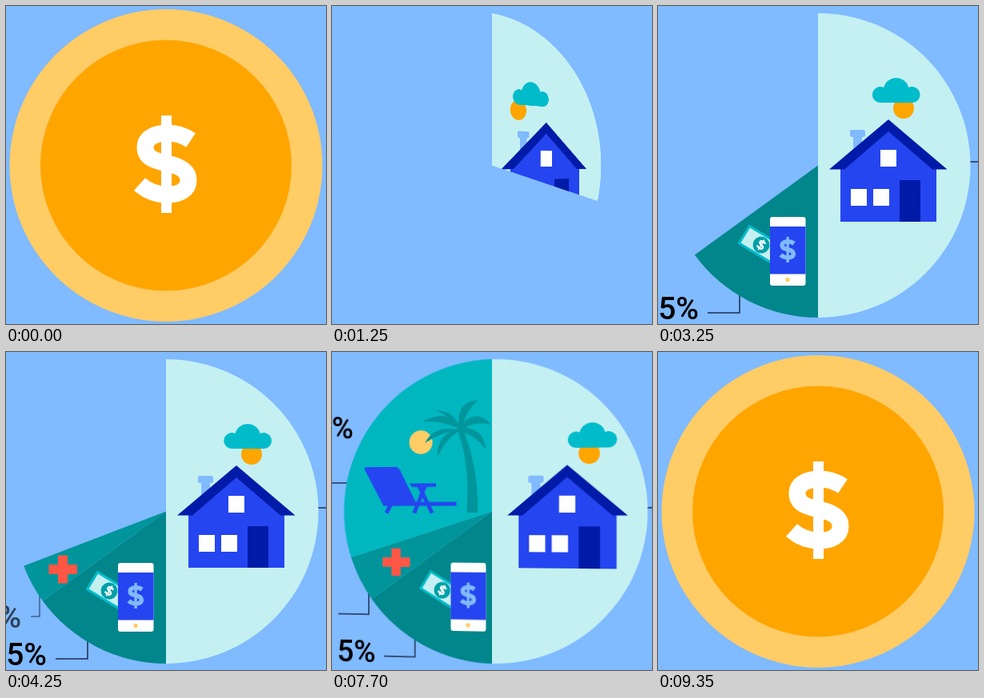
An HTML page for the animation above (9400 ms loop, 400x398 px).

```html
<!DOCTYPE html>
<html lang="en">
<head>
<meta charset="utf-8">
<title>Spending pie</title>
<style>
  html, body { margin: 0; width: 100%; height: 100%; overflow: hidden; background: #80baff; }
  svg { position: absolute; left: 0; top: 0; width: 400px; height: 398px; overflow: visible; transform-origin: 200px 199.5px; }
  text { font: 500 39px Roboto, sans-serif; text-anchor: end; }
  .lead { fill: none; stroke: #1c2d50; stroke-width: 1.5; }
</style>
</head>
<body>
<svg id="pie" viewBox="0 0 400 398">
  <defs>
    <clipPath id="clipHome"><path id="sliceHome"/></clipPath>
    <clipPath id="clipBills"><path id="sliceBills"/></clipPath>
    <clipPath id="clipHealth"><path id="sliceHealth"/></clipPath>
    <clipPath id="clipLeisure"><path id="sliceLeisure"/></clipPath>
    <!-- dollar sign centred on 0,0 -->
    <g id="dollar">
      <path fill="none" stroke="currentColor" stroke-width="21" d="M31-30C22-36 13-39 3-39C-14-39-26-33-26-21C-26-7-12-4 1-1C16 2 28 7 28 20C28 32 17 38 2 38C-12 38-23 34-33 25"/>
      <path fill="currentColor" d="M-6-61H7V61H-6Z"/>
    </g>
  </defs>

  <g id="labels">
    <g id="labelHome"><path class="lead"/></g>
    <g id="labelBills"><path class="lead"/><text y="392">15%</text></g>
    <g id="labelHealth"><path class="lead"/><text y="345">5%</text></g>
    <g id="labelLeisure"><path class="lead"/><text y="106">30%</text></g>
  </g>

  <g clip-path="url(#clipHome)">
    <path fill="#c4f0f2" d="M0 0H400V398H0Z"/>
    <circle id="daySun" cx="307" cy="128" r="13" fill="#ffa500"/>
    <path id="cloud" fill="#00bccb" d="M-19 121A10 10 0 1 1-15.500 102A16 16 0 0 1 15.500 102A10 10 0 1 1 19 121Z"/>
    <g id="house">
      <path fill="#80baff" d="M242 155H257Q259 155 259 157V162Q259 164 255 164V190H244V164Q240 164 240 162V157Q240 155 242 155Z"/>
      <path fill="#2545f0" d="M228 204L288 152L348 204V270H228Z"/>
      <path fill="#001ba8" d="M288 142L361.500 204.500H343L288 157L233 204.500H214ZM302 218H328V270H302Z"/>
      <path fill="#fff" d="M278 180H298V201H278ZM241 229H261V250H241ZM269 229H289V250H269Z"/>
    </g>
  </g>

  <g clip-path="url(#clipBills)">
    <path fill="#00868b" d="M0 0H400V398H0Z"/>
    <g id="bills">
      <g transform="translate(129 299) rotate(31)">
        <rect x="-24.500" y="-12.500" width="49" height="25" fill="#c4f0f2" stroke="#00bccb" stroke-width="3"/>
        <circle r="10.500" fill="#00a0a8"/>
        <use href="#dollar" transform="scale(.12)" color="#fff"/>
      </g>
      <rect x="140" y="264" width="44.500" height="86" rx="3" fill="#fff"/>
      <path fill="#2545f0" d="M140 276H184.500V335.500H140Z"/>
      <circle cx="162" cy="342.500" r="2.700" fill="#ffcc66"/>
      <use href="#dollar" transform="translate(162 305) scale(.262)" color="#80baff"/>
    </g>
  </g>

  <g clip-path="url(#clipHealth)">
    <path fill="#00959b" d="M0 0H400V398H0Z"/>
    <path id="cross" fill="#ff5645" d="M65 246.500H77V258H89V270H77V281.500H65V270H53.500V258H65Z"/>
  </g>

  <g clip-path="url(#clipLeisure)">
    <path fill="#00b7c0" d="M0 0H400V398H0Z"/>
    <circle id="eveSun" cx="103" cy="112" r="15" fill="#ffcc66"/>
    <g fill="#00949b">
      <path d="M156 96Q173 140 168 201H182Q183 140 162 93Z"/>
      <path d="M159 96Q146 68 111 86Q136 84 159 96Z"/>
      <path d="M159 97Q126 90 115 113Q136 99 159 97Z"/>
      <path d="M159 95Q129 102 131 131Q141 108 159 98Z"/>
      <path d="M159 96Q154 72 128 72Q148 79 159 96Z"/>
      <path d="M158 96Q154 60 183 60Q167 72 162 96Z"/>
      <path d="M158 95Q178 67 199 91Q178 85 160 98Z"/>
      <path d="M158 93Q190 94 192 121Q179 104 158 98Z"/>
    </g>
    <g id="chair" fill="#2545f0">
      <path d="M60 143H98Q101 143 103 146L126 192H82L58 147Q56 143 60 143Z"/>
      <path d="M116 164H150V168.500H119ZM82 187.500H176V192.500H82Z"/>
      <path fill="none" stroke="#2545f0" stroke-width="5" d="M92 190L86 201.500M136 167L122 201.500M128 167L145 201.500"/>
    </g>
  </g>
</svg>

<svg id="coin" viewBox="0 0 400 398">
  <circle cx="200" cy="199.500" r="195.500" fill="#ffcc66"/>
  <circle cx="200" cy="199.500" r="157" fill="#ffa500"/>
  <use href="#dollar" transform="translate(200 198)" color="#fff"/>
</svg>

<script>
const LOOP = 9400, CX = 200, CY = 199.5, R = 190.5;
const $ = id => document.getElementById(id);

const span = (t, start, length) => Math.min(1, Math.max(0, (t - start) / length));
const sine = p => (1 - Math.cos(Math.PI * p)) / 2;
const cubic = p => p < .5 ? 4 * p ** 3 : 1 - 4 * (1 - p) ** 3;
const quadOut = p => 1 - (1 - p) ** 2;
const move = (id, x, y = 0) => $(id).setAttribute('transform', `translate(${x} ${y})`);

// Angles run clockwise from the top, in degrees.
const slices = [
  { id: 'Home', from: 0, to: 180, start: 640, length: 1100 },
  { id: 'Bills', from: 180, to: 234, start: 2353, length: 700 },
  { id: 'Health', from: 234, to: 252, start: 3738, length: 700 },
  { id: 'Leisure', from: 252, to: 360, start: 4960, length: 1337 }
];

// Leader lines run from the rim, through a corner, then out sideways.
const labels = [
  { id: 'Home', path: 'M390 195', corner: 390, reach: 40, start: 1700 },
  { id: 'Bills', path: 'M102 362V384', corner: 102, reach: -40, textX: 51, start: 2700 },
  { id: 'Health', path: 'M42 304V331', corner: 42, reach: -40, textX: -10, start: 4140 },
  { id: 'Leisure', path: 'M13 163', corner: 13, reach: -40, textX: 22, start: 5600, fixed: true }
];

function rim(degrees) {
  const a = degrees * Math.PI / 180;
  return `${CX + R * Math.sin(a)} ${CY - R * Math.cos(a)}`;
}

function drawSlice({ id, from, to, start, length }, t) {
  const end = from + (to - from) * sine(span(t, start, length));
  $('slice' + id).setAttribute('d',
    end > from ? `M${CX} ${CY}L${rim(from)}A${R} ${R} 0 0 1 ${rim(end)}Z` : 'M0 0');
}

function drawLabel({ id, path, corner, reach, textX, start, fixed }, t) {
  const p = sine(span(t, start, 320));
  const group = $('label' + id);
  const text = group.querySelector('text');
  group.style.opacity = Math.min(1, p * 2.4);
  group.querySelector('path').setAttribute('d', `${path}H${corner + reach * p}`);
  if (text) text.setAttribute('x', fixed ? textX : textX - reach * (1 - p));
}

function drawIcons(t) {
  const arrive = 1 - quadOut(span(t, 800, 1400));
  const lounge = 1 - quadOut(span(t, 5400, 2000));
  const slide = 26 * sine(span(t, 7500, 600));
  move('daySun', slide * 2 - 143 * arrive);
  move('cloud', 294 + (t - 2400) * .0044 - 58 * arrive + slide);
  move('house', slide * .8);
  move('bills', slide * 1.2);
  move('cross', slide, 30 * (1 - quadOut(span(t, 3900, 725))));
  move('chair', -27.5 + 52 * lounge - 27.5 + slide + 27.5);
  move('eveSun', slide - 53 * lounge, 42 * lounge);
}

function turn(id, angle, depth, visible) {
  $(id).style.transform = angle ? `perspective(${depth}px) rotateY(${angle}deg)` : 'none';
  $(id).style.visibility = visible ? 'visible' : 'hidden';
}

function draw(t) {
  const toPie = 180 * cubic(span(t, 40, 1900));
  const toCoin = 180 * cubic(span(t, 7290, 2100));
  const turned = toPie + toCoin;
  const angle = -(turned - 180 * Math.round(turned / 180));
  const pieUp = Math.round(turned / 180) === 1;
  turn('pie', angle, 700, pieUp);
  turn('coin', angle, 1124, !pieUp);
  slices.forEach(s => drawSlice(s, t));
  labels.forEach(l => drawLabel(l, t));
  drawIcons(t);
}

const began = performance.now();
function tick() {
  draw((performance.now() - began) % LOOP);
  requestAnimationFrame(tick);
}
tick();
</script>
</body>
</html>
```
